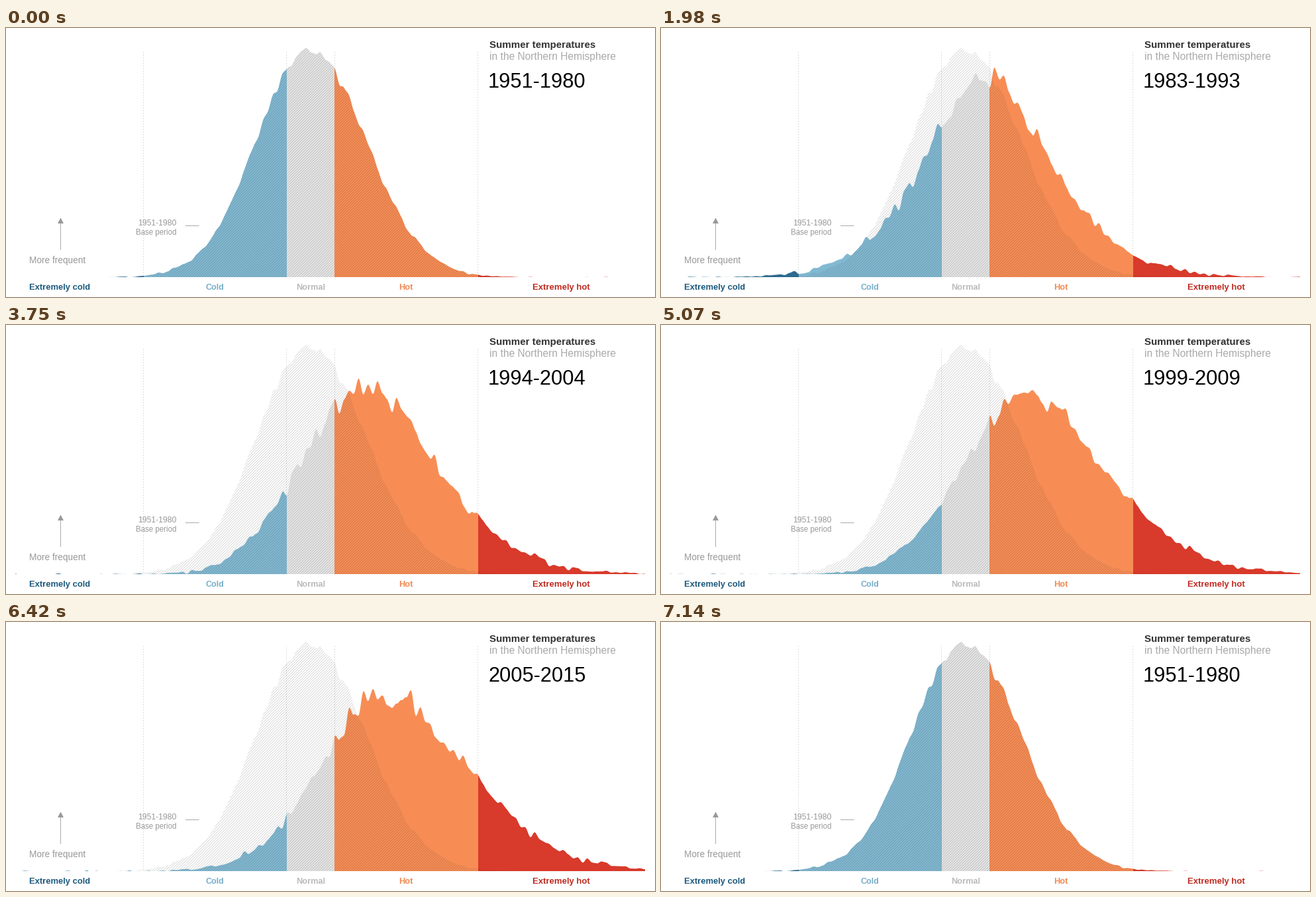
These frames come from a looping animation (980 by 406 pixels, 7230 ms). A matplotlib script:

```python
import math
import numpy as np
import matplotlib.pyplot as plt
from matplotlib.animation import FuncAnimation
from matplotlib.collections import LineCollection
from matplotlib.patches import Polygon

W, H, DPI = 980, 406, 64
PX = 72 / DPI
STEP, LOOP = 30, 7230
BASE = 376
BIN = 7.2
EDGES = [14, 208, 424, 496, 713, 965]
FILLS = ["#2b6b8f", "#82b9d2", "#e5e5e5", "#f78d55", "#d83a2b"]

xs = np.arange(EDGES[0], EDGES[-1] + 1)


def ripple(seed):
    """Smooth random wave with one knot per histogram bin."""
    rng = np.random.default_rng(seed)
    pos = (xs - xs[0]) / BIN
    knots = rng.normal(size=int(pos[-1]) + 2)
    i = pos.astype(int)
    t = pos - i
    return knots[i] + (knots[i + 1] - knots[i]) * t * t * (3 - 2 * t)


def bell(peak, height, left, right, rough, seed):
    """Skewed bell; left and right are (width, power) of each flank."""
    d = xs - peak
    flank = np.where(d < 0, (abs(d) / left[0]) ** left[1],
                     (abs(d) / right[0]) ** right[1])
    h = height * np.exp(-flank)
    h += rough * np.sqrt(h + 0.5) * ripple(seed)
    return BASE - np.maximum(0, h - 0.2)


# First year, last year, outline
PERIODS = [
    (1951, 1980, bell(458, 345, (112, 2.0), (120, 2.0), 0.3, 1)),
    (1983, 1993, bell(492, 311, (131, 1.7), (136, 1.6), 0.55, 2)),
    (1994, 2004, bell(548, 283, (142, 2.2), (148, 1.7), 0.55, 3)),
    (2005, 2015, bell(566, 268, (128, 1.85), (181, 1.93), 0.6, 4)),
]
# Start time, number of steps, period before, period after
MOVES = [(1290, 16, 0, 1), (3090, 16, 1, 2), (4860, 17, 2, 3), (6660, 17, 3, 0)]


def ease(t):
    return 4 * t ** 3 if t < 0.5 else 1 - 4 * (1 - t) ** 3


def state(ms):
    now = PERIODS[0]
    for start, steps, a, b in MOVES:
        if ms >= start:
            e = ease(min(1, ((ms - start) // STEP + 1) / steps))
            now = [p + (q - p) * e for p, q in zip(PERIODS[a], PERIODS[b])]
    return now


def closed(x, y):
    return np.column_stack([np.r_[x[0], x, x[-1]], np.r_[BASE, y, BASE]])


fig = plt.figure(figsize=(W / DPI, H / DPI), dpi=DPI, facecolor="white")
ax = fig.add_axes([0, 0, 1, 1])
ax.set_xlim(0, W)
ax.set_ylim(H, 0)
ax.axis("off")


def label(x, y, s, size, color, bold=False, ha="left"):
    return ax.text(x, y, s, fontsize=size * PX, color=color, ha=ha, va="baseline",
                   family="Liberation Sans", weight="bold" if bold else "normal")


def rule(x0, y0, x1, y1, color, **style):
    ax.plot([x0, x1], [y0, y1], color=color, lw=PX, snap=False,
            solid_capstyle="butt", zorder=1, **style)


for x in EDGES[1:-1]:
    inner = 0.5 if x == 496 else -0.5
    rule(x + inner, 36, x + inner, 375, "#dcdcdc", dashes=(2, 2))

regions = []
for lo, hi, color in zip(EDGES, EDGES[1:], FILLS):
    inside = (xs >= lo) & (xs <= hi)
    shape = Polygon([(lo, BASE), (hi, BASE)], fc=color, ec="none", zorder=2)
    ax.add_patch(shape)
    regions.append((shape, inside))

# Diagonal hatching marks the base period.
base = Polygon(closed(xs, PERIODS[0][2]), fc="none", ec="none")
ax.add_patch(base)
hatch = LineCollection([[(x, BASE), (x + BASE, 0)] for x in range(-240, 780, 4)],
                       colors=[(0.1, 0.1, 0.1, 0.18)], linewidths=0.9 * PX, zorder=3)
ax.add_collection(hatch, autolim=False)
hatch.set_clip_path(base)

label(730.5, 30, "Summer temperatures", 15.1, "#333333", True)
label(730.5, 48, "in the Northern Hemisphere", 15.5, "#aaaaaa")
years = label(728, 90.5, "", 30.7, "#000000")

label(35, 395, "Extremely cold", 13, "#1d5a7e", True)
label(315.5, 395, "Cold", 12.5, "#78aec8", True, "center")
label(460, 395, "Normal", 12.8, "#bbbbbb", True, "center")
label(604, 395, "Hot", 12.8, "#f08a53", True, "center")
label(795, 395, "Extremely hot", 13.1, "#bf2a20", True)

label(258, 298, "1951-1980", 12.2, "#999999", ha="right")
label(258, 312, "Base period", 11.5, "#999999", ha="right")
rule(271, 298.5, 291.5, 298.5, "#aaaaaa")

label(35, 355, "More frequent", 13.6, "#999999")
rule(82.5, 293, 82.5, 335, "#aaaaaa")
ax.add_patch(Polygon([(78, 295), (87, 295), (82.5, 286.5)], fc="#999999", ec="none"))


def draw(frame):
    first, last, y = state(frame * STEP)
    for shape, inside in regions:
        shape.set_xy(closed(xs[inside], y[inside]))
    years.set_text(f"{math.ceil(first)}-{math.ceil(last)}")
    return [shape for shape, _ in regions] + [years]


anim = FuncAnimation(fig, draw, frames=LOOP // STEP, interval=STEP,
                     repeat=True, repeat_delay=0)
plt.show()
```
